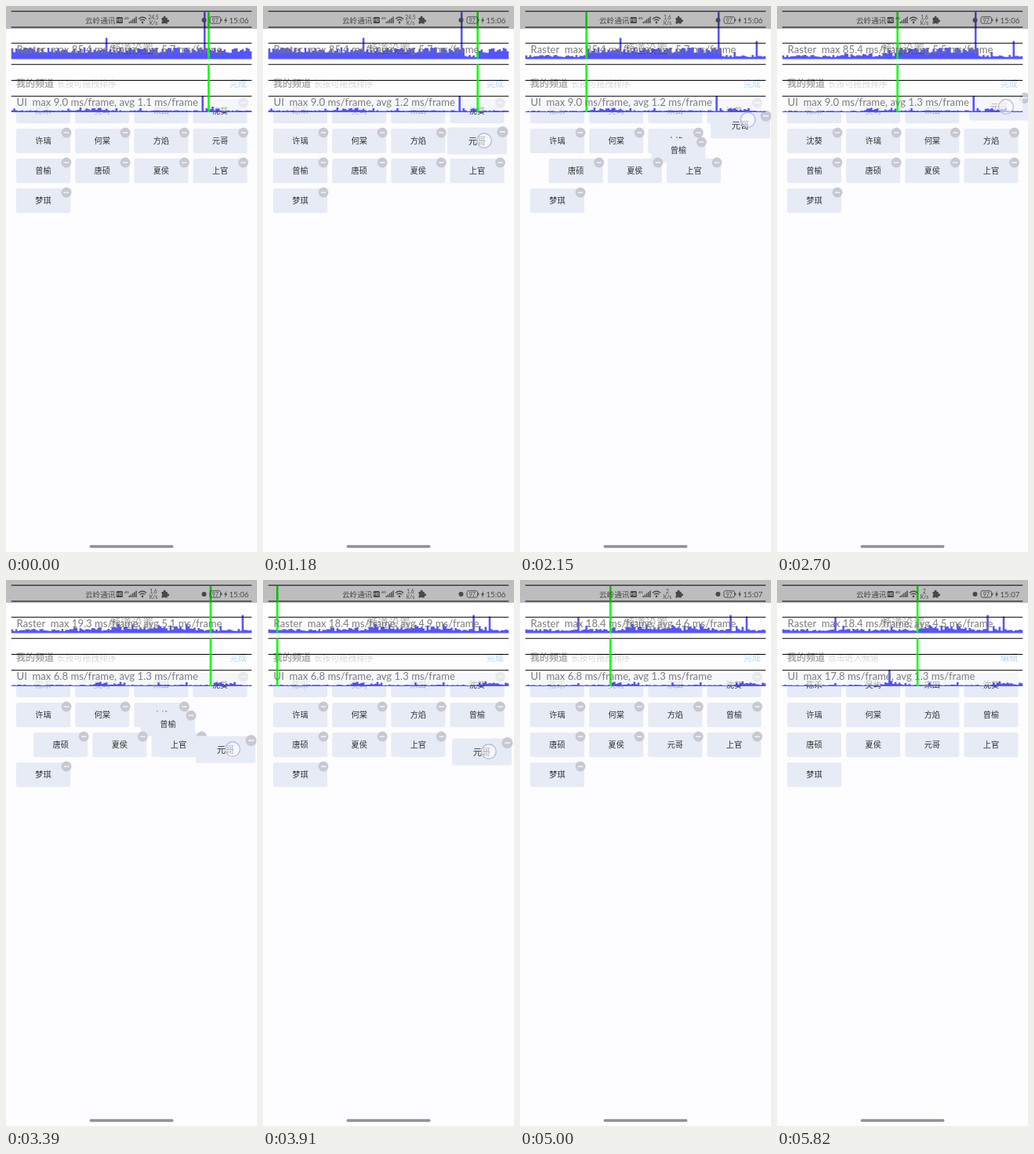
An HTML page that plays this animation: 320x694 px, repeating every 6.15 s.

```html
<!DOCTYPE html>
<html lang="zh-CN">
<head>
<meta charset="utf-8">
<title>频道设置</title>
<style>
  html, body { margin: 0; width: 100%; height: 100%; overflow: hidden; background: #fdfcff; }
  svg { display: block; width: 320px; height: 694px; }
  text { font-family: "Noto Sans CJK SC", "Noto Sans CJK", sans-serif; white-space: pre; }
  .latin { font-family: Lato, sans-serif; }
  .label { font-size: 13.1px; fill: #7d7d7d; }
  .tile { fill: #333; }
  .tile text { font-size: 10.2px; text-anchor: middle; }
  .tile rect { fill: #e6ebf6; }
  .editing .fixed { fill: #aaa; }
  .badge { visibility: hidden; }
  .editing .badge { visibility: visible; }
  .fixed .badge { display: none; }
  .badge circle { fill: #c7c8d2; }
  .badge path { stroke: #fff; stroke-width: 1.2; }
  .bars { fill: #00f; fill-opacity: .667; }
  .rule { stroke: #000; stroke-width: 1.15; }
  .status { fill: #48484a; }
  .mid { text-anchor: middle; }
</style>
</head>
<body>
<svg viewBox="0 0 320 694">
  <rect width="320" height="694" fill="#fdfcff"/>
  <rect width="320" height="77" fill="#fff"/>
  <text class="mid" x="160" y="59" font-size="14" fill="#222">频道设置</text>
  <text x="13" y="102.5" font-size="12" font-weight="700" fill="#222">我的频道</text>
  <text id="hint" x="65" y="102.5" font-size="10.8" fill="#999"></text>
  <text id="action" x="307" y="102.5" font-size="11" fill="#3f9bf0" text-anchor="end"></text>
  <g id="tiles"></g>
  <g id="charts"></g>

  <rect width="320" height="29" fill="#000" fill-opacity=".26"/>
  <g class="status">
    <text x="101" y="21.5" font-size="9.6">云岭通讯</text>
    <rect x="140.5" y="14" width="8.5" height="8" rx="1.6"/>
    <text class="latin mid" x="144.8" y="20" font-size="5" font-weight="700" fill="#c4c4c6">HD</text>
    <text class="latin" x="151" y="17" font-size="4.5" font-weight="700">4G</text>
    <path d="M156.5 22v-2h1.4v2zm2.2 0v-3.6h1.4v3.6zm2.2 0v-5.2h1.4v5.2zm2.2 0v-6.8h1.4v6.8zm2.2 0v-8.4h1.4v8.4z"/>
    <path d="M169 16.4q5-4.4 10 0M170.8 18.6q3.2-2.8 6.4 0" fill="none" stroke="#48484a" stroke-width="1.3"/>
    <circle cx="174" cy="20.9" r="1.3"/>
    <text id="speed" class="latin mid" x="188" y="16.8" font-size="6.8"></text>
    <text class="latin mid" x="188" y="24" font-size="6.8">K/s</text>
    <path d="M198.5 15h2.2a1.6 1.6 0 1 1 2.8 0h2.2v2.4a1.6 1.6 0 1 1 0 2.8v2.3h-2.4a1.5 1.5 0 0 0-2.6 0h-2.2v-2.4a1.5 1.5 0 0 0 0-2.6z"/>
    <circle cx="252.5" cy="18" r="3"/>
    <rect x="260" y="13.7" width="13.5" height="8.4" rx="2" fill="none" stroke="#48484a" stroke-width=".9"/>
    <rect x="274.2" y="16.3" width="1.1" height="3.2"/>
    <text class="latin mid" x="266.8" y="20.6" font-size="7">97</text>
    <path d="M281 13.8l-3 4.9h1.8l-.7 3.7 3.1-5h-1.9z"/>
    <text id="clock" class="latin" x="284.5" y="21.7" font-size="9.7"></text>
  </g>
  <rect x="106.5" y="685.3" width="107" height="3.4" rx="1.7" fill="#909095"/>
  <circle id="touch" r="9.3" fill="#fff" fill-opacity=".6" stroke="#aab0d8" stroke-opacity=".8" stroke-width="1.4"/>
</svg>
<script>
const LOOP = 6150, LIFT = 1000, DROP = 4780, EDIT_END = 5480;
const TILE_W = 69, TILE_H = 31, SHIFT = 200, LAG = 20;
const SAMPLES = 120, LEFT = 6.75, WIDTH = 306.5, STEP = WIDTH / SAMPLES, CHART_H = 60.75;

const $ = id => document.getElementById(id);
const clamp = v => Math.max(0, Math.min(1, v));
const mix = (a, b, p) => a + (b - a) * p;
const ramp = (t, from, len) => clamp((t - from) / len);
const linear = p => p;
const smooth = p => p * p * (3 - 2 * p);
const mod = (a, b) => ((a % b) + b) % b;
const rand = n => mod(Math.sin(n * 127.1 + 311.7) * 43758.5453, 1);

function add(parent, tag, attrs, text = '') {
  const node = document.createElementNS('http://www.w3.org/2000/svg', tag);
  for (const k in attrs) node.setAttribute(k, attrs[k]);
  node.textContent = text;
  return parent.appendChild(node);
}

function setText(node, text) {
  if (node.textContent !== text) node.textContent = text;
}

// keys: [time, ...values]
function track(keys, t, ease = linear) {
  let [, ...value] = keys[0];
  for (let i = 1; i < keys.length; i++) {
    const [from] = keys[i - 1], [to, ...goal] = keys[i];
    const p = ease(ramp(t, from, to - from));
    value = value.map((v, j) => mix(v, goal[j], p));
  }
  return value;
}

// ---- tiles ----
const names = '陈禾 吴屿 宋田 沈葵 许璃 何棠 方焰 曾榆 唐硕 夏侯 上官 梦琪'.split(' ');
const FIXED = 3, HOME = 7, END = 10;

// where the finger turns or rests
const finger = [
  [1300, 282, 171], [1600, 285, 209], [1910, 285, 209], [2250, 292, 128],
  [2750, 292, 128], [3350, 289, 215], [3900, 288, 218], [4350, 210, 206]
];
// time, slot the held tile opens
const moves = [[1460, 11], [2088, 7], [2290, 3], [2960, 7], [3250, 11], [4236, END]];

const slotPos = s => [47.5 + (s % 4) * 75.17, 133.5 + Math.floor(s / 4) * 38];
const fingerAt = t => track(finger, t, smooth);

function makeTile(name, i) {
  const g = add($('tiles'), 'g', { class: i < FIXED ? 'tile fixed' : 'tile' });
  add(g, 'rect', { x: -TILE_W / 2, y: -TILE_H / 2, width: TILE_W, height: TILE_H, rx: 2 });
  add(g, 'text', { y: 3.8 }, name);
  const badge = add(g, 'g', { class: 'badge', transform: 'translate(29.5 -10.5)' });
  add(badge, 'circle', { r: 6.4 });
  add(badge, 'path', { d: 'M-3.2 0h6.4' });
  return g;
}

const others = names.map(makeTile);
const held = makeTile('元哥');

function place(g, [x, y], scale = 1) {
  g.setAttribute('transform', `translate(${x} ${y}) scale(${scale})`);
}

function otherPos(i, t) {
  const at = gap => slotPos(i < gap ? i : i + 1);
  return moves.reduce((pos, [time, gap]) => {
    const p = ramp(t, time, SHIFT), goal = at(gap);
    return pos.map((v, j) => mix(v, goal[j], p));
  }, at(HOME));
}

function heldPos(t, settle) {
  if (t < LIFT) return slotPos(HOME);
  const [x, y] = fingerAt(t - LAG), end = slotPos(END);
  return [mix(x - 9, end[0], settle), mix(y + .5, end[1], settle)];
}

function drawTiles(t) {
  const settle = ramp(t, DROP, SHIFT), editing = t < EDIT_END;
  others.forEach((g, i) => place(g, otherPos(i, t)));
  place(held, heldPos(t, settle), 1 + .1 * ramp(t, LIFT, 100) * (1 - settle));
  $('tiles').classList.toggle('editing', editing);
  setText($('hint'), editing ? '长按可拖拽排序' : '点击进入频道');
  setText($('action'), editing ? '完成' : '编辑');
}

function drawTouch(t) {
  const dragging = t > 550 && t < DROP, tapping = t > 5400 && t < 5500;
  const [x, y] = tapping ? [297, 98] : fingerAt(t);
  const dot = $('touch');
  dot.setAttribute('cx', x);
  dot.setAttribute('cy', y);
  dot.setAttribute('visibility', dragging || tapping ? 'visible' : 'hidden');
}

// ---- performance charts ----
// time, samples rendered so far; no frames are drawn while the screen rests
const head = [[0, 98.4], [1040, 98.4], [2150, 150.2], [2700, 177.3], [3390, 219.5],
              [4390, 267.2], [5090, 285], [5390, 285], [5820, 307.4]];
const CALM = 98;
const rasterPeaks = { 47: 27, 96: 60, 115: 23, 222: 23, 230: 21, 266: 20 };
const uiPeaks = { 95: 21, 293: 21 };

const spike = (n, odds, h) => rand(n + 900) < odds ? h : 0;

function rasterHeight(n) {
  if (n in rasterPeaks) return rasterPeaks[n];
  if (n < CALM) return 8 + 7 * rand(n);
  const busy = n > 148 && n < 216 ? 4 * rand(n + 500) : 0;
  return 2.5 + 3 * rand(n) + busy + spike(n, .07, 5);
}

function uiHeight(n) {
  if (n in uiPeaks) return uiPeaks[n];
  const burst = Math.cos((n - 40) * Math.PI / 32) > .75 ? 4 * rand(n + 3000) : 0;
  return (n < CALM ? 1.4 : .9) + 1.2 * rand(n + 2000) + burst + spike(n, .05, 3);
}

function makeChart(top, height) {
  const g = $('charts'), bottom = top + CHART_H;
  add(g, 'rect', { x: LEFT, y: top, width: WIDTH, height: CHART_H, fill: '#fff', 'fill-opacity': .6 });
  const bars = add(g, 'path', { class: 'bars' });
  for (let i = 0; i < 3; i++)
    add(g, 'path', { class: 'rule', d: `M${LEFT} ${top + i * CHART_H / 3}h${WIDTH}` });
  const cursor = add(g, 'rect', { y: top, width: STEP, height: CHART_H, fill: '#0f0' });
  const label = add(g, 'text', { class: 'latin label', x: 13.6, y: top + 53 });
  return (n, text) => {
    const last = Math.floor(n);
    let d = `M${LEFT} ${bottom}`;
    for (let i = 0; i < SAMPLES; i++) {
      const h = height(last - mod(last - i, SAMPLES));
      d += `V${(bottom - h).toFixed(2)}H${(LEFT + (i + 1) * STEP).toFixed(2)}`;
    }
    bars.setAttribute('d', `${d}V${bottom}Z`);
    cursor.setAttribute('x', LEFT + mod(last, SAMPLES) * STEP);
    setText(label, text);
  };
}

const drawRaster = makeChart(6.75, rasterHeight);
const drawUi = makeChart(74.25, uiHeight);

function drawCharts(t) {
  const [n] = track(head, t);
  const rasterAvg = 5.7 - 1.2 * ramp(n, 150, 150);
  const uiAvg = 1.14 + .14 * ramp(n, CALM, 72);
  // a peak counts until the cursor overwrites it
  const rasterMax = n < 216 ? 85.4 : n < 235 ? 19.3 : 18.4;
  const uiMax = n < 215 ? 9 : n < 293 ? 6.8 : 17.8;
  const line = (name, max, avg) =>
    `${name}\u00a0 max ${max.toFixed(1)} ms/frame, avg ${avg.toFixed(1)} ms/frame`;
  drawRaster(n, line('Raster', rasterMax, rasterAvg));
  drawUi(n, line('UI', uiMax, uiAvg));
}

function drawStatus(t) {
  setText($('speed'), t < 1900 ? '24.5' : t < 4900 ? '1.6' : '2');
  setText($('clock'), t < 4900 ? '15:06' : '15:07');
}

const start = performance.now();
function frame() {
  const t = (performance.now() - start) % LOOP;
  drawTiles(t);
  drawCharts(t);
  drawStatus(t);
  drawTouch(t);
  requestAnimationFrame(frame);
}
frame();
</script>
</body>
</html>
```
